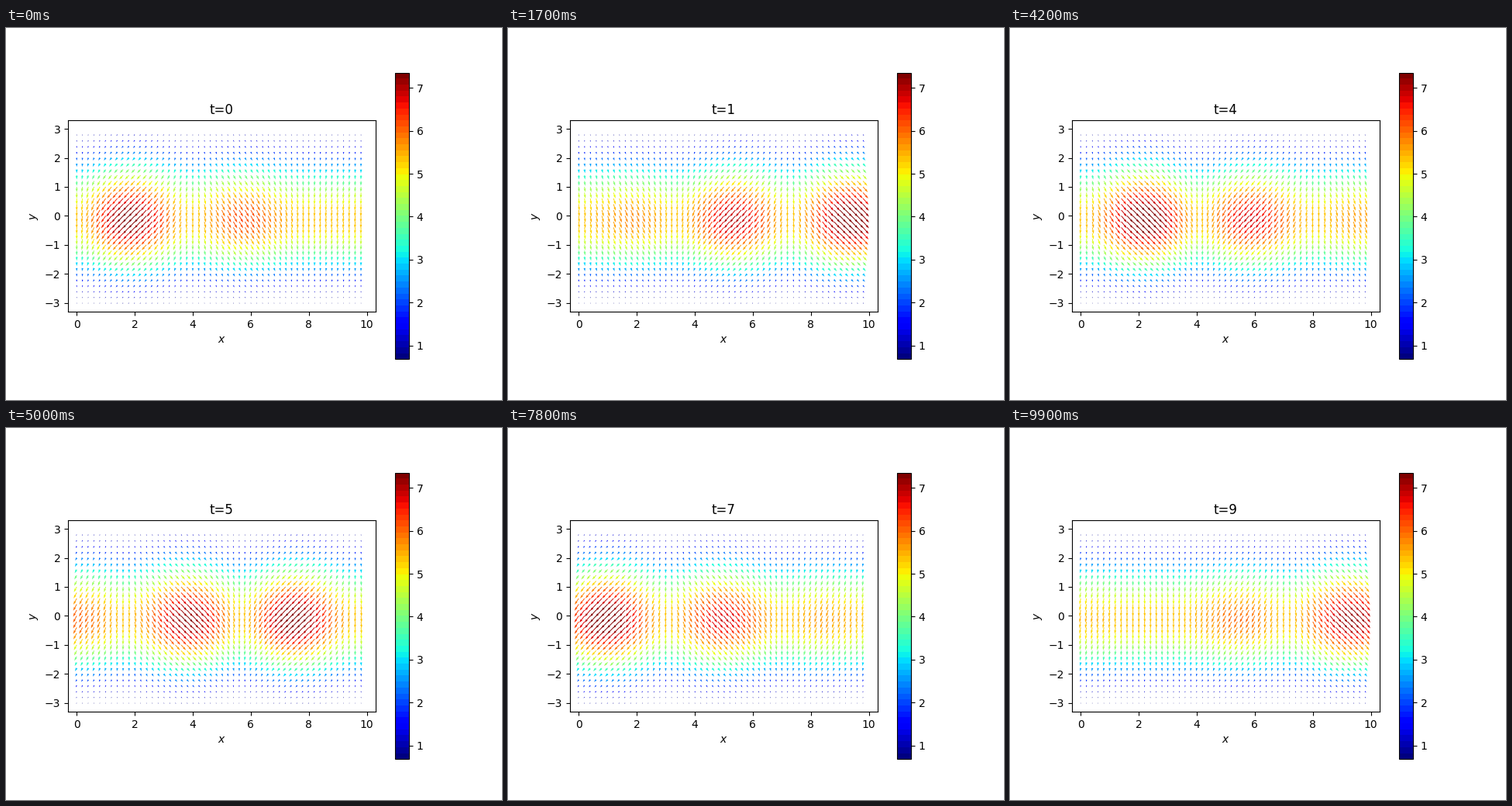
A matplotlib script that plays this animation: 640 by 480 pixels, repeating every 10000 ms.

```python
import numpy as np
import matplotlib.pyplot as plt
from matplotlib.animation import FuncAnimation

FRAMES, STEP = 100, 0.1
V0, AMP, SPREAD = 5.35, 2.65, 4.39
# (wave number, angular frequency) of the two superposed waves
WAVES = ((0.3 * np.pi, 2.34), (0.2 * np.pi, 0.695))

X, Y = np.meshgrid(np.arange(0, 10, 0.2), np.arange(-3, 3, 0.2))
beam = np.exp(-Y**2 / SPREAD)


def field(t):
    u = -AMP * beam * sum(np.sin(k * X - w * t) for k, w in WAVES)
    v = -V0 * beam
    return u, v, np.hypot(u, v)


fig, ax = plt.subplots(figsize=(6.4, 4.8), dpi=100)
u, v, mag = field(0)
arrows = ax.quiver(X, Y, u, v, mag, cmap=plt.get_cmap("jet", 48),
                   scale=1.8 * mag.mean() * np.sqrt(mag.size))
arrows.set_clim(mag.min(), mag.max())
fig.colorbar(arrows, ax=ax)

ax.set_aspect("equal")
ax.set_xlim(-0.3, 10.3)
ax.set_ylim(-3.3, 3.3)
ax.set_xlabel("$x$")
ax.set_ylabel("$y$")
title = ax.set_title("t=0")


def update(i):
    arrows.set_UVC(*field(i * STEP))
    title.set_text(f"t={i // 10}")
    return arrows, title


anim = FuncAnimation(fig, update, frames=FRAMES, interval=100,
                     repeat=True, repeat_delay=0)
plt.show()
```
